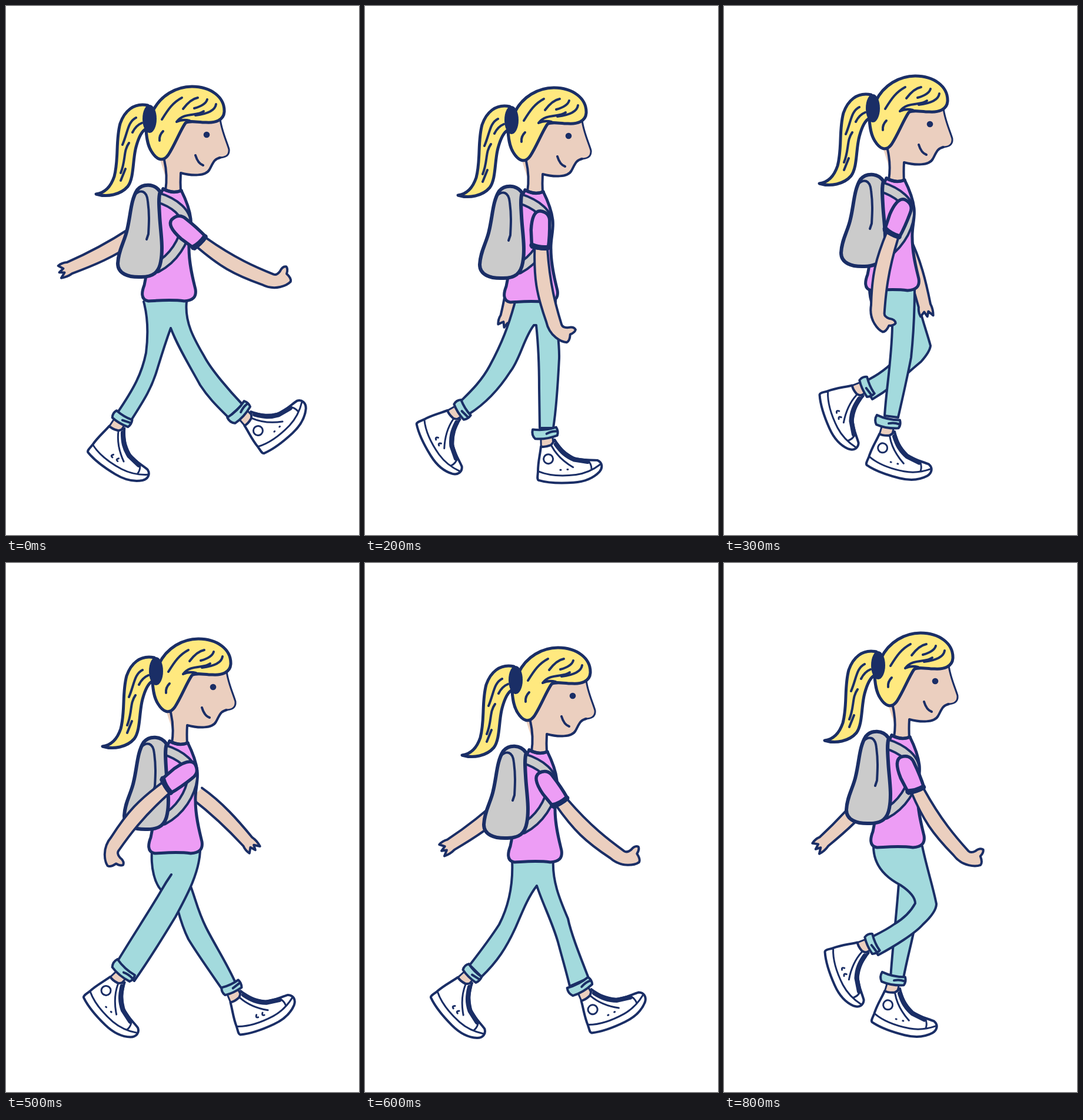
Recreate the animation shown at these times as an HTML page. Size 600 px wide and 900 px high, loop 900 ms.

```html
<!DOCTYPE html>
<html lang="en">
<head>
<meta charset="utf-8">
<title>Walk cycle</title>
<style>
  html, body { margin: 0; width: 100%; height: 100%; overflow: hidden; background: #fff; }
  svg { display: block; width: 100vw; height: 100vh; }
  svg * { stroke-linecap: round; stroke-linejoin: round; }
  g, path, ellipse, circle { stroke: #1a2e66; stroke-width: 4; fill: none; }
  .skin { fill: #ebcfbf; }
  .hair { fill: #ffe97f; stroke-width: 5; }
  .pink { fill: #ed9df5; stroke-width: 5; }
  .grey { fill: #cbcbcb; stroke-width: 6; }
  .teal { fill: #a3dadd; }
  .white { fill: #fff; }
  .ink { fill: #1a2e66; stroke: none; }
  .bare { stroke: none; }
  .thin { stroke-width: 3; }
  .bold { stroke-width: 5.5; }
  .band { stroke-width: 9; }
  .pose { visibility: hidden; }
  .pose.on { visibility: visible; }
</style>
</head>
<body>
<svg viewBox="0 0 600 900">
  <defs>
    <path id="strap" d="M256 325C288 335 308 352 306 374C303 400 285 430 256 445"/>

    <g id="body">
      <path class="skin bare" d="M262 262L271 290V316Q284 321 296 316V284C315 291 340 290 346 278C352 268 352 262 362 258C372 258 380 255 379 244C377 235 366 212 364 190L300 180Z"/>
      <path class="thin" d="M364 192C366 212 377 235 379 244C380 255 372 258 362 258"/>
      <path d="M364 258C352 261 352 268 346 278C340 290 315 289 297 284Q296 300 297 316M269 262C272 275 274 295 271 314"/>
      <path class="pink" d="M267 311Q283 320 298 314C306 330 312 345 314 362C316 380 310 395 311 412C311 440 318 465 322 482C324 495 318 501 303 502C280 499 262 501 242 502C228 500 231 485 235 475C238 462 240 450 242 420L260 326Z"/>
      <path class="bold" d="M267 311Q283 320 298 314"/>
      <path d="M256 325C288 335 308 352 306 374C303 400 285 430 256 445" style="stroke-width:20"/>
      <path d="M256 325C288 335 308 352 306 374C303 400 285 430 256 445" style="stroke:#cbcbcb;stroke-width:12"/>
      <path class="grey" d="M262 316C252 301 232 302 223 313C212 330 212 355 206 380C202 400 191 415 190 438C190 455 207 462 230 461C250 461 260 453 263 435C268 410 262 380 261 355C260 340 259 325 262 316Z"/>
      <path d="M219 321C228 312 239 313 241 332C244 355 243 370 242 388L239 397"/>
      <path class="hair" d="M241 169C216 164 201 180 194 200C186 230 192 260 184 290C178 308 168 318 153 320C172 326 195 321 207 307C218 292 215 262 221 240C225 225 230 213 238 209"/>
      <path d="M221 190C207 197 207 215 198 236M231 199Q221 203 215 215M209 233C199 247 204 262 195 284M203 277L195 297"/>
      <path class="hair" d="M249 180C262 152 290 137 316 137C348 137 372 155 371 180C370 195 355 199 340 198C325 198 312 194 305 199C296 212 287 236 276 253C267 266 256 262 247 247C240 236 239 222 238 212"/>
      <path d="M290 197C303 180 325 188 336 179M299 156C284 164 276 175 265 193M326 156C315 158 307 167 301 175M342 159Q339 169 320 174M357 167Q355 182 322 186M267 213Q260 220 261 229M290 197Q300 192 312 195"/>
      <ellipse class="ink" cx="244" cy="192" rx="12" ry="24"/>
      <circle class="ink" cx="341" cy="219" r="5.3"/>
      <path d="M322 254C325 264 329 269 335 271"/>
    </g>

    <g id="nearArm">
      <path class="skin" d="M10 46C30 95 45 118 80 155C88 166 98 171 106 173Q118 176 126 173Q130 169 126 158Q132 152 131 147Q126 143 118 149Q110 153 106 149C85 125 60 95 32 42"/>
      <path class="pink bold" d="M-7 23C-14 5 -15 -9 -6 -13C4 -16 12 -13 16 -3C22 10 28 25 32 39Q20 47 6 49Z"/>
      <path class="band" d="M5 46Q18 46 31 39"/>
    </g>

    <path id="farArm" class="skin" d="M-122 -8C-80 -16 -40 -14 -2 -11Q8 -13 18 -10L9 -4L17 0L8 3L14 11Q6 13 -2 10C-40 9 -80 11 -122 17"/>

    <g id="shoe">
      <path class="skin thin" d="M10 -74L9 -52H30V-74"/>
      <path class="white" d="M9 -56C6 -40 2 -30 1 -14C0 -6 -2 -1 1 1C20 8 42 9 60 9C80 9 94 4 105 -6C112 -13 111 -22 103 -26C92 -28 75 -27 63 -33C48 -42 40 -52 33 -66Q28 -58 25 -57Q15 -54 9 -56Z"/>
      <path class="thin" d="M2 -14C20 -5 45 -3 65 -4C80 -5 96 -11 108 -19M27 -56C34 -40 45 -28 61 -17M87 -27Q93 -20 92 -11"/>
      <path d="M35 -58C43 -45 50 -37 64 -30L86 -25" style="stroke-width:8"/>
    </g>
    <g id="nearShoe">
      <use href="#shoe"/>
      <circle class="thin" cx="20" cy="-34" r="8"/>
      <path class="thin" d="M39 -14h1M51 -14h1"/>
      <path class="teal" d="M-3 -86Q17 -82 37 -87Q41 -80 38 -73Q18 -67 0 -70Q-6 -77 -3 -86ZM20 -77Q29 -81 37 -80"/>
    </g>
    <g id="farShoe">
      <use href="#shoe"/>
      <path class="thin" d="M40 -18q-4 4 1 5M51 -17q-4 4 1 5"/>
      <path class="teal" d="M6 -85Q22 -82 37 -85Q40 -78 37 -71Q20 -68 6 -71Q2 -78 6 -85ZM23 -76L36 -79"/>
    </g>
  </defs>
</svg>
<script>
const STEP = 100;

const stride = 'M264 500C252 545 240 575 220 612C205 640 185 658 167 676L185 694C215 675 237 650 255 622C272 600 278 565 295 543H299C303 580 304 620 304 650L305 718H328C334 680 336 640 338 600C339 570 332 540 332 500';

// Placements are [x, y, angle].
const poses = [
  { body: [0, 0], nearArm: [293, 372, -27], farArm: [106, 446, 155],
    nearShoe: [437, 761, -43], farShoe: [139, 758, 31],
    frontLeg: 'M234 503C240 525 243 550 238 590C231 625 218 650 188 694L212 706C235 670 248 650 258 615C265 592 272 570 280 548C292 580 312 612 330 645C345 668 360 682 378 700L402 678C380 655 350 620 338 598C322 570 303 540 307 503' },
  { body: [1, 12.5], nearArm: [290, 375, 0], farArm: [157, 508, 136],
    nearShoe: [346, 807, -18], farShoe: [83, 718, 57],
    frontLeg: 'M254 517C246 548 232 580 205 615C190 635 172 658 158 682L174 704C200 682 222 655 240 622C255 598 268 566 288 549H291C300 580 308 615 312 640C320 670 325 700 327 725L349 718C351 690 346 640 342 615C338 580 324 545 320 515' },
  { body: [5, 2], nearArm: [298, 363, 24], farArm: [240, 530, 102],
    nearShoe: [294, 806, -4], farShoe: [88, 710, 58],
    frontLeg: stride, shift: -8 },
  { body: [9, -18], nearArm: [303, 343, 45], farArm: [341, 512, 74],
    nearShoe: [242, 780, 14], farShoe: [163, 660, 66],
    backLeg: 'M328 495C335 530 345 555 351 578Q350 588 335 605C305 630 285 650 252 669L235 641C255 632 270 622 285 608L290 490',
    frontLeg: 'M247 480C247 510 262 535 286 545C285 600 276 650 273 697L296 700C305 660 312 630 318 598C322 560 324 520 324 480' },
  { body: [10, -31], nearArm: [307, 329, 61], farArm: [378, 480, 60],
    nearShoe: [188, 768, 28], farShoe: [300, 748, 10],
    backLeg: 'M330 468C345 520 362 560 362 590C358 620 354 640 351 674L322 668C325 640 325 620 322 600C315 570 300 540 295 500',
    frontLeg: 'M247 468C245 500 252 530 262 545C255 590 240 640 227 690L262 708C280 670 300 620 312 575C322 540 328 505 330 468' },
  { body: [11, -8], nearArm: [310, 351, 76], farArm: [412, 476, 46],
    nearShoe: [132, 738, 44], farShoe: [397, 802, -25],
    backLeg: 'M312 545C322 570 325 590 340 620C355 650 375 680 391 716L370 729C350 700 325 665 310 640C300 620 296 605 292 590',
    frontLeg: 'M248 490C246 520 253 545 264 557C245 590 215 635 188 680L218 711C240 680 265 640 288 602C305 570 328 530 330 490M264 557Q272 543 281 530' },
  { body: [12, 7], nearArm: [304, 369, -13], farArm: [144, 480, 145],
    nearShoe: [384, 799, -26], farShoe: [112, 738, 45],
    frontLeg: 'M250 505C252 545 246 580 228 615C212 640 195 662 178 684L198 704C225 678 240 655 256 620C267 595 276 570 292 549C302 580 318 610 328 645C336 675 342 695 348 720L380 706C366 670 350 630 345 605C330 570 318 540 320 505' },
  { body: [13, 4], nearArm: [307, 365, 16], farArm: [210, 530, 119],
    nearShoe: [302, 806, -4], farShoe: [96, 710, 58],
    frontLeg: stride },
  { body: [18, -18], nearArm: [307, 343, -1], farArm: [168, 475, 136],
    nearShoe: [251, 780, 14], farShoe: [172, 660, 66], farLegInFront: true,
    backLeg: 'M297 545C293 600 287 650 283 706L305 706C312 670 318 650 324 620L338 575',
    frontLeg: 'M254 482C254 515 275 535 300 548C318 560 325 570 325 579C318 592 305 605 290 614C275 625 260 632 243 640L262 667C290 652 325 630 338 615C352 602 361 590 361 580C355 550 345 520 337 482' }
];

const place = (id, [x, y, angle = 0]) =>
  `<use href="#${id}" transform="translate(${x} ${y}) rotate(${angle})"/>`;
const leg = (d, shift = 0) =>
  `<path class="teal" d="${d}" transform="translate(${shift} 0)"/>`;

// Parts are stacked from back to front.
function draw(pose) {
  const shoes = ['farShoe', 'nearShoe'];
  if (pose.farLegInFront) shoes.reverse();
  const [backShoe, frontShoe] = shoes.map(id => place(id, pose[id]));
  const farArm = place('farArm', pose.farArm);
  const legs = pose.backLeg
    ? [leg(pose.backLeg), backShoe, farArm, leg(pose.frontLeg), frontShoe]
    : [farArm, leg(pose.frontLeg, pose.shift), backShoe, frontShoe];
  return `<g class="pose">${legs.join('')}${place('body', pose.body)}${place('nearArm', pose.nearArm)}</g>`;
}

document.querySelector('svg').insertAdjacentHTML('beforeend', poses.map(draw).join(''));
const groups = document.querySelectorAll('.pose');
const start = performance.now();

function show() {
  const elapsed = performance.now() - start;
  const current = Math.floor(elapsed / STEP) % poses.length;
  groups.forEach((group, i) => group.classList.toggle('on', i === current));
  requestAnimationFrame(show);
}
show();
</script>
</body>
</html>
```
